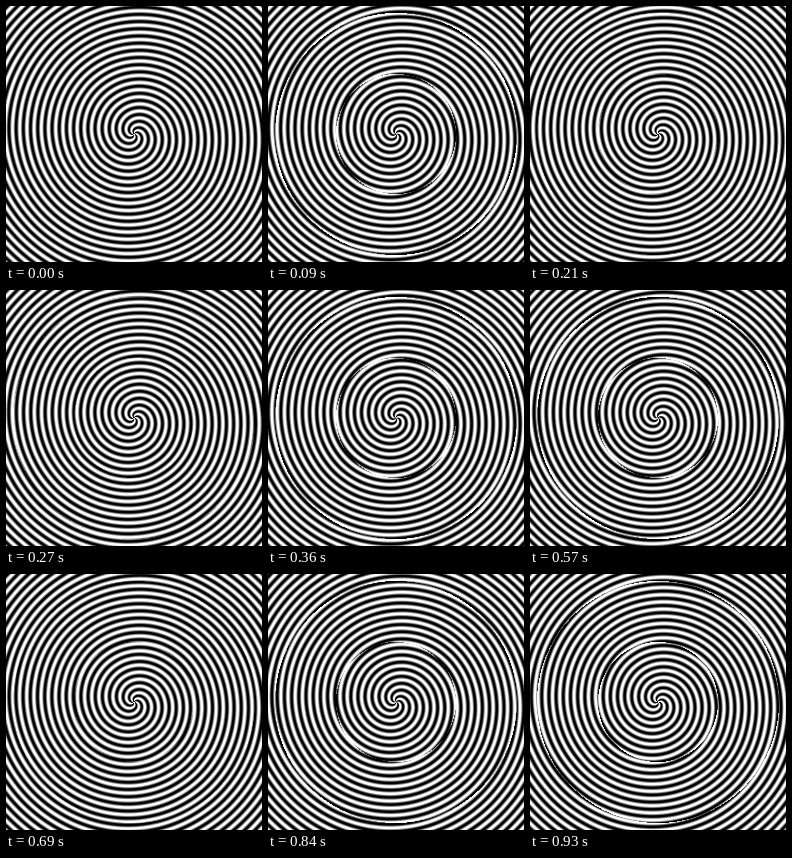
Write an HTML page with a canvas that moves like this. It is 256x256 px and loops after 960 ms.

```html
<!DOCTYPE html>
<html lang="en">
<head>
<meta charset="utf-8">
<title>Spiral rings</title>
<style>
html, body { margin: 0; width: 100%; height: 100%; overflow: hidden; background: #fff; }
canvas { display: block; width: 256px; height: 256px; }
</style>
</head>
<body>
<canvas id="stage" width="256" height="256"></canvas>
<script>
const SIZE = 256, CENTER = 128;
const ARMS = 5, PITCH = 7.2, OFFSET = 0.6;
const INNER = 60, OUTER = 121;
const STEP = 30, STEPS = 32, CYCLES = 7;
const TAU = Math.PI * 2;

const ctx = document.getElementById("stage").getContext("2d");
const image = ctx.createImageData(SIZE, SIZE);
const pixels = new Uint32Array(image.data.buffer);
const phase = new Float32Array(SIZE * SIZE);
const spin = new Int8Array(SIZE * SIZE);

// The middle ring turns against the disc and the outer field.
for (let y = 0, i = 0; y < SIZE; y++) {
  for (let x = 0; x < SIZE; x++, i++) {
    const dx = x + 0.5 - CENTER, dy = y + 0.5 - CENTER;
    const r = Math.hypot(dx, dy);
    phase[i] = ARMS * Math.atan2(dy, dx) / TAU - r / PITCH + OFFSET;
    spin[i] = r >= INNER && r < OUTER ? -1 : 1;
  }
}

function draw(step) {
  const shift = CYCLES * step / STEPS;
  for (let i = 0; i < pixels.length; i++) {
    // A steep clipped wave gives stripes with soft edges one pixel wide.
    const wave = 0.5 + 0.6 * Math.sin(TAU * (phase[i] - spin[i] * shift));
    const level = Math.round(255 * Math.min(1, Math.max(0, wave)));
    pixels[i] = 0xff000000 | level * 0x010101;
  }
  ctx.putImageData(image, 0, 0);
}

const start = performance.now();
let shown = -1;

function tick() {
  const elapsed = Math.max(0, performance.now() - start);
  const step = Math.floor(elapsed / STEP) % STEPS;
  if (step !== shown) draw(shown = step);
  requestAnimationFrame(tick);
}
tick();
</script>
</body>
</html>
```
